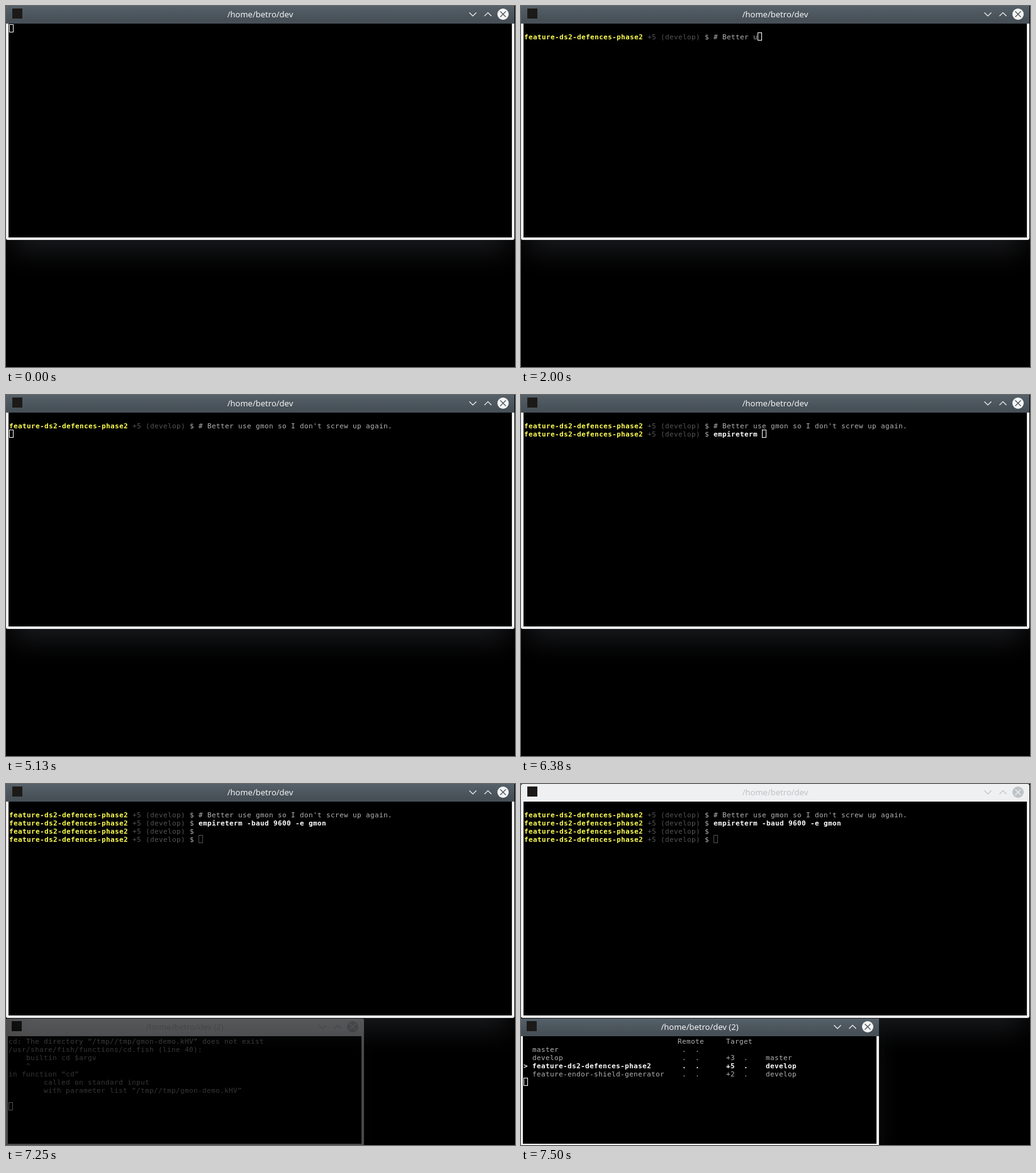
These frames come from a looping animation (809x574 px, 8 s). An HTML page:

```html
<!DOCTYPE html>
<html lang="en">
<head>
<meta charset="utf-8">
<title>Terminal session</title>
<style>
html, body { margin: 0; width: 100%; height: 100%; overflow: hidden; background: #000; }
svg { display: block; }
text { white-space: pre; }
.title { font: 13px "Noto Sans", "Open Sans", sans-serif; text-anchor: middle; }
.screen { font: 11px "DejaVu Sans Mono", monospace; fill: #b2b2b2; }
.screen .dim { fill: #545454; }
.screen .branch { fill: #ffff54; font-weight: bold; }
.screen .bold { fill: #fff; font-weight: bold; }
</style>
</head>
<body>
<svg id="stage" width="809" height="574" viewBox="0 0 809 574">
  <defs>
    <linearGradient id="bar" x1="0" y1="0" x2="0" y2="1">
      <stop offset="0" stop-color="#556069"/>
      <stop offset=".8" stop-color="#475057"/>
    </linearGradient>
    <filter id="blur" x="-20%" y="-40%" width="140%" height="180%" color-interpolation-filters="sRGB">
      <feGaussianBlur stdDeviation="22"/>
    </filter>
  </defs>
</svg>
<script>
const LOOP = 8000, CELL_W = 7, CELL_H = 13, BAR_H = 28;
const stage = document.getElementById('stage');

const BRANCH = 'feature-ds2-defences-phase2';
const NOTE = "# Better use gmon so I don't screw up again.";
const COMMAND = 'empireterm -baud 9600 -e gmon';
const INPUT_COL = 43;

// Keystroke counts as [tick, characters]
const noteKeys = [[13, 0], [16, 10], [20, 24], [23, 37], [24, 37], [25, 44]];
const commandKeys = [[49, 0], [52, 16], [53, 16], [54, 23], [55, 29]];

// A run of text is [row, column, text, class]
const errorRuns = [
  'cd: The directory “/tmp//tmp/gmon-demo.kHV” does not exist',
  '/usr/share/fish/functions/cd.fish (line 40):',
  '    builtin cd $argv',
  '    ^',
  'in function “cd”',
  '        called on standard input',
  '        with parameter list “/tmp//tmp/gmon-demo.kHV”'
].map((line, row) => [row, 0, line]);

function branchRuns(row, name, ahead, target, cls) {
  const runs = [[row, 2, name, cls], [row, 36, '.', cls], [row, 39, '.', cls]];
  if (ahead) runs.push([row, 46, ahead, cls], [row, 50, '.', cls], [row, 55, target, cls]);
  return runs;
}

const tableRuns = [
  [0, 35, 'Remote'], [0, 46, 'Target'],
  ...branchRuns(1, 'master'),
  ...branchRuns(2, 'develop', '+3', 'master'),
  [3, 0, '>', 'bold'],
  ...branchRuns(3, BRANCH, '+5', 'develop', 'bold'),
  ...branchRuns(4, 'feature-endor-shield-generator', '+2', 'develop')
];

function prompt(row) {
  return [[row, 0, BRANCH, 'branch'], [row, 28, '+5 (develop)', 'dim'], [row, 41, '$']];
}

function typed(keys, tick) {
  if (tick <= keys[0][0]) return 0;
  for (let i = 1; i < keys.length; i++) {
    const [t0, n0] = keys[i - 1], [t1, n1] = keys[i];
    if (tick <= t1) return Math.round(n0 + (n1 - n0) * (tick - t0) / (t1 - t0));
  }
  return keys[keys.length - 1][1];
}

function buttons(w, fg, bg) {
  const mid = 13;
  return `<g fill="none" stroke="${fg}" stroke-width="1.2">
    <path d="M${w - 71.5} 10.5l5.5 5.5l5.5 -5.5M${w - 47.5} 16l5.5 -5.5l5.5 5.5"/>
    <circle cx="${w - 18}" cy="${mid}" r="9" fill="${fg}" stroke="none"/>
    <path d="M${w - 22.5} 8.5l9 9m0 -9l-9 9" stroke="${bg}"/></g>`;
}

function makeWindow(x, y, w, h, label) {
  const bar = `M0 ${BAR_H}V3Q0 0 3 0H${w - 3}Q${w} 0 ${w} 3V${BAR_H}Z`;
  const caption = fg => `<text class="title" x="${w / 2}" y="18" fill="${fg}">${label}</text>`;
  const g = document.createElementNS('http://www.w3.org/2000/svg', 'g');
  g.setAttribute('transform', `translate(${x} ${y})`);
  g.innerHTML = `
    <rect x="10" y="30" width="${w - 20}" height="${h - 12}" fill="#34363c" opacity=".5" filter="url(#blur)"/>
    <rect width="${w}" height="${h}" rx="3" fill="#eff0f1"/>
    ${caption('#bdc3c7')}${buttons(w, '#bdc3c7', '#eff0f1')}
    <g class="active"><path d="${bar}" fill="url(#bar)"/>
      ${caption('#f4f5f5')}${buttons(w, '#f4f5f5', '#475057')}</g>
    <rect x="10" y="4" width="16" height="16" fill="#1c1a18"/>
    <rect x="4" y="${BAR_H}" width="${w - 8}" height="${h - BAR_H - 4}"/>
    <g class="screen"></g>`;
  stage.append(g);
  const active = g.querySelector('.active'), screen = g.querySelector('.screen');
  return {
    fade(opacity) { g.setAttribute('opacity', opacity); },
    focus(amount) { active.setAttribute('opacity', amount); },
    print(runs, row, col, color) {
      screen.innerHTML = runs.map(drawRun).join('') + drawCursor(row, col, color);
    }
  };
}

const left = col => 5 + col * CELL_W;
const top_ = row => BAR_H + 1 + row * CELL_H;

function drawRun([row, col, text, cls = '']) {
  const xs = Array.from(text, (_, i) => left(col + i)).join(' ');
  const safe = text.replace(/>/g, '&gt;');
  return `<text class="${cls}" x="${xs}" y="${top_(row) + 11}">${safe}</text>`;
}

function drawCursor(row, col, color) {
  return `<rect x="${left(col) + .5}" y="${top_(row) + .5}" width="${CELL_W - 1}"
    height="${CELL_H - 1}" fill="none" stroke="${color}"/>`;
}

const shell = makeWindow(0, 0, 808, 372, '/home/betro/dev');
const monitor = makeWindow(-1, 373, 570, 203, '/home/betro/dev (2)');

function drawShell(tick) {
  const runs = [];
  let row = 0, col = 0;
  if (tick >= 5) row = 1;
  if (tick >= 6) {
    const n = typed(noteKeys, tick);
    runs.push(...prompt(1), [1, INPUT_COL, NOTE.slice(0, n)]);
    col = INPUT_COL + n;
  }
  if (tick >= 41) { row = 2; col = 0; }
  if (tick >= 42) {
    const n = typed(commandKeys, tick);
    runs.push(...prompt(2), [2, INPUT_COL, COMMAND.slice(0, n), 'bold']);
    col = INPUT_COL + n;
  }
  if (tick >= 56) { runs.push(...prompt(3)); row = 3; col = INPUT_COL; }
  if (tick >= 57) { runs.push(...prompt(4)); row = 4; }
  shell.print(runs, row, col, tick >= 58 ? '#505050' : '#fff');
}

function drawMonitor(tick) {
  const ready = tick >= 60;
  const focus = ready ? 1 : tick === 59 ? .7 : 0;
  monitor.fade(ready ? 1 : tick === 59 ? .8 : tick === 58 ? .3 : 0);
  monitor.focus(focus);
  shell.focus(1 - focus);
  if (ready) monitor.print(tableRuns, 5, 0, '#fff');
  else monitor.print(errorRuns, 8, 0, '#fff');
}

let shown = -1;
function render(time) {
  // The screen refreshes eight times a second, on 10 ms marks
  const tick = Math.floor(Math.floor(time % LOOP / 10) / 12.5);
  if (tick === shown) return;
  shown = tick;
  drawShell(tick);
  drawMonitor(tick);
}

const start = performance.now();
function loop() {
  render(performance.now() - start);
  requestAnimationFrame(loop);
}
loop();
</script>
</body>
</html>
```
